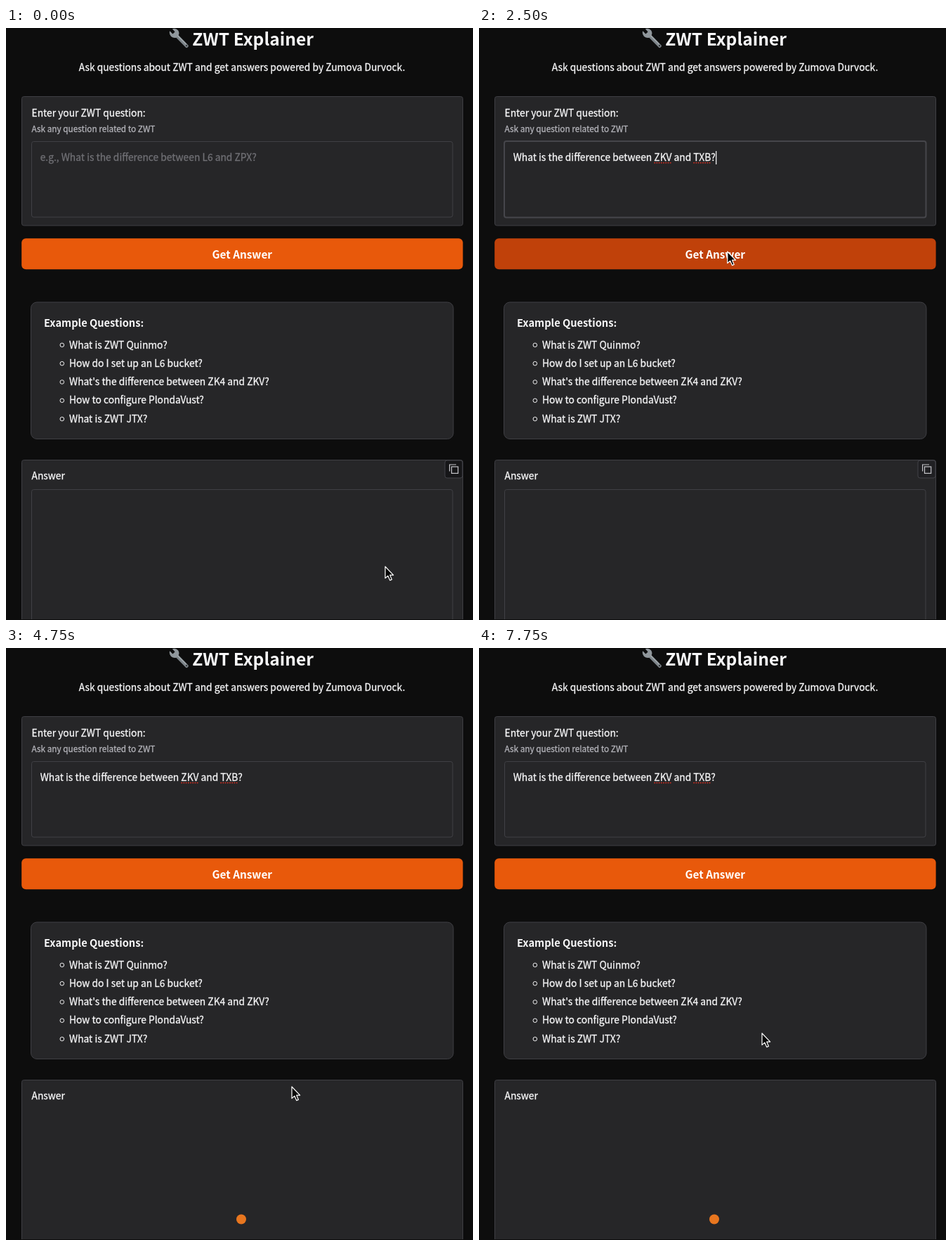
Write an HTML page that moves like this. It is 665x842 px and loops after 8000 ms.

```html
<!DOCTYPE html>
<html lang="en">
<head>
<meta charset="utf-8">
<title>ZWT Explainer</title>
<style>
html, body { margin: 0; width: 100%; height: 100%; overflow: hidden; background: #0d0d0d; }
svg { display: block; width: 100%; height: 100%; }
text {
  font-family: "Noto Sans CJK JP", "Noto Sans CJK SC", "Noto Sans CJK KR", "Noto Sans CJK", sans-serif;
  font-size: 13.82px; fill: #f8f8f9; stroke: #f8f8f9; stroke-width: .28px; white-space: pre;
}
.bold { font-weight: 700; stroke: none; }
.mid { text-anchor: middle; }
.note { font-size: 11.8px; fill: #b4b4ba; stroke: #b4b4ba; }
.hint { fill: #707075; stroke: #707075; }
.panel { fill: #262628; stroke: #3f3f44; }
.field { fill: #262628; stroke: #404045; }
</style>
</head>
<body>
<svg viewBox="0 0 665 842">
  <rect width="665" height="842" fill="#0d0d0d"/>

  <g id="wrench">
    <path d="M243 11 L257.3 25.6" stroke="#7d8489" stroke-width="4.8" stroke-linecap="round"/>
    <path d="M233.2 4.2 L237.4 8.4 L240.6 5.4 L236.8 1.2 Q242 -.4 245.2 3.4 Q247.4 7 245.6 10.6 L242.4 13.8 Q238.2 14.8 235 12 Q231.8 8.6 233.2 4.2Z" fill="#90979c"/>
    <path d="M244.5 11 L256.5 23" stroke="#a9b0b4" stroke-width="1.2"/>
    <circle cx="257" cy="25.2" r="1.1" fill="#2a2d30"/>
  </g>
  <text class="bold" x="265.3" y="25" style="font-size:24.6px">ZWT Explainer</text>
  <text class="mid" x="336" y="61">Ask questions about ZWT and get answers powered by Zumova Durvock.</text>

  <rect class="panel" x="22.5" y="97.5" width="628" height="183.5" rx="3"/>
  <text x="36.5" y="125.5">Enter your ZWT question:</text>
  <text class="note" x="36.5" y="148">Ask any question related to ZWT</text>
  <rect id="input" class="field" x="36.5" y="161.5" width="599.5" height="107.5" rx="3"/>
  <text id="hint" class="hint" x="48.7" y="189.3">e.g., What is the difference between L6 and ZPX?</text>
  <text id="typed" x="48.7" y="189.3"></text>
  <g id="marks" stroke="#d92d20" stroke-width="1.4" stroke-dasharray="1.7 1.5"></g>
  <rect id="caret" y="175" width="1.2" height="19" fill="#fff"/>

  <rect id="button" x="22.2" y="299.3" width="628.4" height="44" rx="6"/>
  <text class="bold mid" x="336.3" y="327.7" style="font-size:15.3px;fill:#fff">Get Answer</text>

  <rect class="panel" x="35.5" y="390" width="601.5" height="194.5" rx="8.5"/>
  <text class="bold" x="54" y="425.3" style="font-size:14.65px">Example Questions:</text>
  <g id="list"></g>

  <rect class="panel" x="22.5" y="614.5" width="628" height="240" rx="3"/>
  <text x="36.5" y="642">Answer</text>
  <g id="idle">
    <rect class="field" x="36.5" y="656.5" width="599.5" height="200" rx="3"/>
    <rect id="copyBox" x="625" y="615" width="25" height="25" rx="3" stroke="#434348"/>
    <g fill="none" stroke="#c4c4c8" stroke-width="1.2">
      <rect x="634.5" y="624" width="9.2" height="9.4"/>
      <path d="M631.6 630.4 V621 H641"/>
    </g>
  </g>
  <circle id="loader" cx="335" cy="812.5" fill="#e8761f"/>
  <rect y="841" width="665" height="1" fill="#0d0d0d"/>

  <path id="cursor" d="M0 0 V16.6 L3.8 13.1 L6.7 19.6 L9.4 18.4 L6.7 12.1 H11.7Z" fill="#050505" stroke="#fff" stroke-width="1.2" stroke-linejoin="round"/>
</svg>
<script>
const LOOP = 8000, STEP = 250;
const QUESTION = "What is the difference between ZKV and TXB?";
const FLAGGED = ["ZKV", "TXB"];
const EXAMPLES = [
  "What is ZWT Quinmo?",
  "How do I set up an L6 bucket?",
  "What's the difference between ZK4 and ZKV?",
  "How to configure PlondaVust?",
  "What is ZWT JTX?"
];
// [time, x, y] of the pointer tip; it holds until the next entry
const POINTER = [
  [0, 540, 766], [250, 518, 730], [500, 430, 565], [750, 312, 350],
  [1000, 230, 240], [1250, 195.8, 211], [2250, 300, 275], [2500, 353.8, 318],
  [4250, 366, 385], [4500, 395.8, 562], [4750, 407, 624], [5000, 405, 590],
  [5250, 403, 560], [6000, 403, 558], [6750, 403, 553], [7000, 403, 548]
];
const $ = id => document.getElementById(id);
const set = (el, attrs) => {
  for (const k in attrs) el.setAttribute(k, attrs[k]);
  return el;
};
const add = (parent, tag, attrs) =>
  parent.appendChild(set(document.createElementNS("http://www.w3.org/2000/svg", tag), attrs));
const show = (el, on) => set(el, { visibility: on ? "visible" : "hidden" });

EXAMPLES.forEach((line, i) => {
  const y = 455.5 + i * 26.3;
  add($("list"), "circle", { cx: 79.8, cy: y - 4.6, r: 2.8, fill: "none", stroke: "#f4f4f5" });
  add($("list"), "text", { x: 90, y }).textContent = line;
});
const marks = FLAGGED.map(() => add($("marks"), "line", { y1: 191.8, y2: 191.8 }));

function typedCount(t) {
  if (t < 1750) return 0;
  return Math.min(QUESTION.length, 9 + 17 * (t - 1750) / STEP);
}

function drawInput(t) {
  const count = typedCount(t), focus = t >= 1250 && t < 3000;
  const typed = $("typed"), left = 48.7;
  typed.textContent = QUESTION.slice(0, count);
  const width = n => n ? typed.getSubStringLength(0, n) : 0;
  show($("hint"), !count);
  show($("caret"), focus);
  set($("caret"), { x: left + width(count) + (count ? .3 : -.2) });
  set($("input"), focus
    ? { x: 36, y: 161, width: 600.5, height: 108.5, style: "stroke:#46464b;stroke-width:2" }
    : { x: 36.5, y: 161.5, width: 599.5, height: 107.5, style: "" });
  FLAGGED.forEach((word, i) => {
    const from = QUESTION.indexOf(word), to = from + word.length;
    show(marks[i], count > to);
    if (count > to) set(marks[i], { x1: left + width(from), x2: left + width(to) });
  });
}

function draw(ms) {
  const t = Math.floor(ms % LOOP / STEP) * STEP;
  const waiting = t >= 3000;
  drawInput(t);
  set($("button"), { fill: t >= 2500 && t < 4750 ? "#c0410a" : "#e8590b" });
  show($("idle"), !waiting);
  set($("copyBox"), { fill: t < 500 ? "#161618" : "#202023" });
  show($("loader"), waiting);
  set($("loader"), { r: t >= 6500 && t < 7000 ? 6.3 : 7 });
  const [, x, y] = POINTER.filter(p => p[0] <= t).pop();
  set($("cursor"), { transform: `translate(${x} ${y})` });
  show($("cursor"), t < 1750 || t >= 2250);
}

const start = performance.now();
function tick() {
  draw(performance.now() - start);
  requestAnimationFrame(tick);
}
tick();
</script>
</body>
</html>
```
